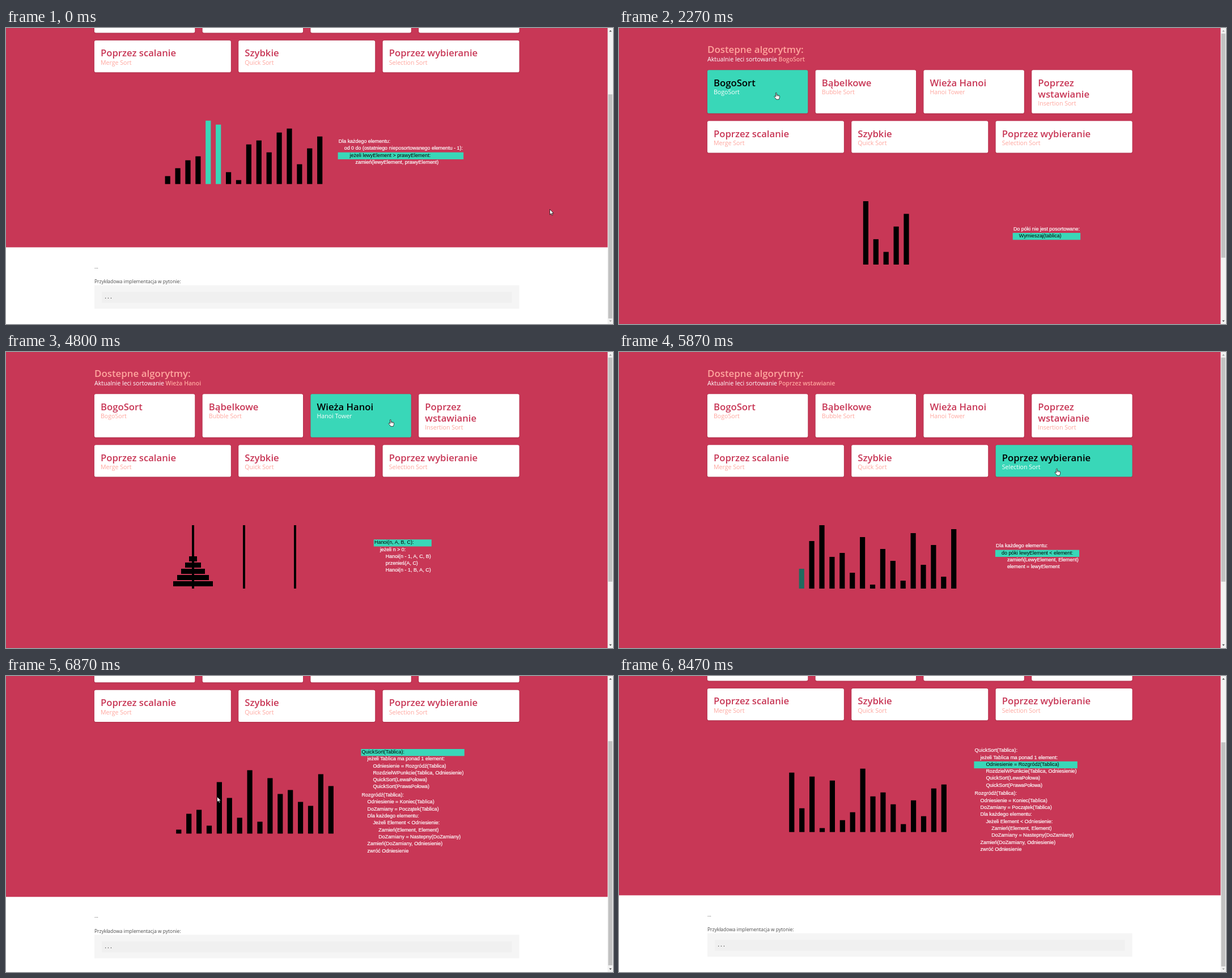
Animation, 1071 px wide and 523 px high, one loop 8740 ms. Source, as an HTML page:

```html
<!DOCTYPE html>
<html lang="pl">
<head>
<meta charset="utf-8">
<title>Sortowanie</title>
<style>
  html, body { margin: 0; width: 100%; height: 100%; overflow: hidden; background: #fff; }
  svg { display: block; width: 100%; height: 100%; }
  text { font-family: "Open Sans", "Noto Sans", sans-serif; white-space: pre; }
  .title { font-size: 16.7px; font-weight: 600; fill: #c83756; }
  .sub { font-size: 10.6px; fill: #ffa69e; }
  .strong { font-size: 10.5px; font-weight: 600; fill: #ffa69e; }
  .card rect {
    fill: #fff; stroke: rgba(10, 10, 10, .1); stroke-width: 1.1px; paint-order: stroke;
    filter: drop-shadow(0 1.1px .8px rgba(10, 10, 10, .1));
  }
  .card.hover rect { fill: #39d7b8; }
  .card.hover .title { fill: #000; }
  .card.hover .sub { fill: #fff; }
  .code text { font: 8.93px "Liberation Sans", Arial, sans-serif; fill: #fff; stroke: #fff; stroke-width: .2px; }
  .code text.on { fill: #000; stroke: none; }
  .note { font-size: 8.45px; fill: #4a4a4a; }
  .mono { font: 8px "DejaVu Sans Mono", "Noto Sans Mono", monospace; fill: #222; }
</style>
</head>
<body>
<svg viewBox="0 0 1071 523" preserveAspectRatio="none">
  <rect width="1071" height="523" fill="#fff"/>
  <g id="page">
    <rect y="-2" width="1062" height="531.8" fill="#c83756"/>
    <text class="title" x="156" y="44" style="fill:#ffa69e;font-size:16.9px">Dostepne algorytmy:</text>
    <text class="sub" x="156" y="58.6" style="fill:#fff">Aktualnie leci sortowanie</text>
    <text class="strong" id="current" x="281.5" y="58.6"></text>
    <g id="cards"></g>
    <g id="bars"></g>
    <g id="code" class="code"></g>
    <text class="note" x="156" y="567">...</text>
    <text class="note" x="156" y="593.2">Przykładowa implementacja w pytonie:</text>
    <rect x="155.9" y="596.8" width="749.7" height="41.5" fill="#f5f5f5"/>
    <rect x="169" y="608.3" width="723.5" height="19.6" fill="#f0f0f0"/>
    <text class="mono" x="173.3" y="620.8">...</text>
  </g>
  <rect x="1061.5" width="9.5" height="523" fill="#f1f1f1"/>
  <rect id="thumb" x="1062.6" width="7.3" height="396" fill="#c1c1c1"/>
  <path id="up" d="M1064.2 6.5h4.6l-2.3-2.8z"/>
  <path id="down" d="M1064.2 516.5h4.6l-2.3 2.8z"/>
  <g id="cursor" fill="#fff" stroke="#000" stroke-width="1.3" stroke-linejoin="round">
    <path id="arrow" transform="scale(.56)" d="M0 0V17L4 13.3L6.6 19.3L9.2 18.2L6.7 12.3H12Z"/>
    <g id="hand" transform="translate(-3.6 -.3) scale(.56)">
      <path d="M5 2C5 .2 8 .2 8 2V8C8.6 7 10.6 7.2 11 8.6C12 7.8 13.6 8.2 14 9.6C15 9 17.4 9.4 17.4 11.2V15C17.4 18.5 15.5 19 15.5 22H7C6.5 19.5 1 15.5 .6 13C.5 11 3.4 11 5 13.6Z"/>
      <path d="M8 8v4M11 8.6v3.6M14 9.6v3" fill="none" stroke-width="1"/>
    </g>
  </g>
</svg>
<script>
const LOOP = 8740, TICKS_PER_MS = 15 / 1000;
const MAX_SCROLL = 142.3, FLOOR = 418, TALLEST = 112, ROW = 12.3;
const LEFT = 155.9, WIDTH = 749.7, GAP = 13.4;
const TEAL = '#39d7b8', DIM = '#1f6b5f';
const $ = id => document.getElementById(id);

const smooth = (t, from, to) => {
  const p = Math.min(1, Math.max(0, (t - from) / (to - from)));
  return p * p * (3 - 2 * p);
};
const rect = (x, y, w, h, fill) => `<rect x="${x}" y="${y}" width="${w}" height="${h}" fill="${fill}"/>`;
const label = (cls, x, y, s) => `<text class="${cls}" x="${x}" y="${y}">${s.replace(/</g, '&lt;')}</text>`;

function cardRow(y, h, items) {
  const w = (WIDTH - GAP * (items.length - 1)) / items.length;
  return items.map(([title, sub], i) => ({ title: title.split('\n'), sub, x: LEFT + i * (w + GAP), y, w, h }));
}

const cards = [
  ...cardRow(74.2, 76.6, [['BogoSort', 'BogoSort'], ['Bąbelkowe', 'Bubble Sort'],
    ['Wieża Hanoi', 'Hanoi Tower'], ['Poprzez\nwstawianie', 'Insertion Sort']]),
  ...cardRow(164.2, 56.3, [['Poprzez scalanie', 'Merge Sort'], ['Szybkie', 'Quick Sort'],
    ['Poprzez wybieranie', 'Selection Sort']])
];

// Each leading space in a code line is one indent step; an empty line is a short gap.
const views = {
  bogo: {
    name: 'BogoSort', barX: 430.8, codeX: 695.9,
    code: ['Do póki nie jest posortowane:', ' Wymieszaj(tablica)']
  },
  bubble: {
    name: 'Bąbelkowe', barX: 280.6, codeX: 586.8,
    code: ['Dla każdego elementu:', ' od 0 do (ostatniego nieposortowanego elementu - 1):',
      '  jeżeli lewyElement > prawyElement:', '   zamień(lewyElement, prawyElement)']
  },
  hanoi: {
    name: 'Wieża Hanoi', codeX: 650,
    code: ['Hanoi(n, A, B, C):', ' jeżeli n > 0:', '  Hanoi(n - 1, A, C, B)',
      '  przenieś(A, C)', '  Hanoi(n - 1, B, A, C)']
  },
  insertion: {
    name: 'Poprzez wstawianie', barX: 317.6, codeX: 665.1,
    code: ['Dla każdego elementu:', ' do póki lewyElement < element:',
      '  zamień(LewyElement, Element)', '  element = lewyElement']
  },
  quick: {
    name: 'Szybkie', barX: 300.2, codeX: 627.6,
    code: ['QuickSort(Tablica):', ' jeżeli Tablica ma ponad 1 element:',
      '  Odniesienie = Rozgródź(Tablica)', '  RozdzielWPunkcie(Tablica, Odniesienie)',
      '  QuickSort(LewaPołowa)', '  QuickSort(PrawaPołowa)', '',
      'Rozgródź(Tablica):', ' Odniesienie = Koniec(Tablica)', ' DoZamiany = Początek(Tablica)',
      ' Dla każdego elementu:', '  Jeżeli Element < Odniesienie:', '   Zamień(Element, Element)',
      '   DoZamiany = Nastepny(DoZamiany)', ' Zamień(DoZamiany, Odniesienie)', ' zwróć Odniesienie']
  }
};

// Bars are spelled as letters, a being the shortest.
const scenes = [
  { at: 0, view: 'bubble', bars: 'bdfgpocajkhmneil', line: 2, marked: [4, 5] },
  { at: 34, view: 'bogo', bars: 'ebacd', line: 1 },
  { at: 46, view: 'bogo', bars: shuffle('ebacd', 7), line: 1 },
  { at: 49, view: 'bubble', bars: 'bifnlkamdgejpcoh', line: 0 },
  { at: 58, line: 1 },
  { at: 66, view: 'hanoi', line: 0 },
  { at: 80, view: 'insertion', bars: 'elphidmajgbnfkco', line: 0 },
  { at: 86, line: 1, marked: [0], tint: DIM },
  { at: 95, view: 'quick', bars: 'aefbmidpcnjkhgol', line: 0, marked: [] },
  { at: 115, bars: 'ofnamcepijgbhdkl' },
  { at: 127, line: 2 }
];
scenes.forEach((s, i) => {
  const before = scenes[i - 1];
  const base = !before ? {} : s.view ? { marked: [], tint: TEAL } : before;
  scenes[i] = { tint: TEAL, ...base, ...s };
});

const home = [959.5, 320.3];
// Cursor glides: start tick, end tick, destination.
const glides = [
  [3, 21, 921, 314.8], [21, 32, 277.2, 114.2], [36, 41, 459.5, 124.3], [54, 60, 622, 120],
  [69, 77, 800, 118], [85, 88, 772.5, 206], [91, 95, 505, 197], [98, 103, 372.5, 213.3],
  [112, 115, 308, 52], [119, 124, 92, 530]
];

function shuffle(word, seed) {
  const a = [...word];
  for (let i = a.length - 1; i > 0; i--) {
    seed = (seed * 16807) % 2147483647;
    const j = seed % (i + 1);
    [a[i], a[j]] = [a[j], a[i]];
  }
  return a.join('');
}

const scrollAt = t => MAX_SCROLL * (1 - smooth(t, 19, 28.5) + smooth(t, 99, 103.36));

function cursorAt(t) {
  return glides.reduce(([x, y], [from, to, toX, toY]) => {
    const p = smooth(t, from, to);
    return [x + (toX - x) * p, y + (toY - y) * p];
  }, home);
}

function cardMarkup({ title, sub, x, y, w, h }) {
  const left = x + 11.1, lineH = 20.1;
  const lines = title.map((s, i) => label('title', left, y + 28.4 + i * lineH, s)).join('');
  const subY = y + 43 + (title.length - 1) * lineH;
  return `<g class="card"><rect x="${x}" y="${y}" width="${w}" height="${h}" rx="2.8"/>${lines}${label('sub', left, subY, sub)}</g>`;
}

function barMarkup({ view, bars, marked, tint }) {
  return [...bars].map((c, i) => {
    const h = TALLEST * (c.charCodeAt(0) - 96) / bars.length;
    return rect(views[view].barX + i * 17.9, FLOOR - h, 9.2, h, marked.includes(i) ? tint : '#000');
  }).join('');
}

function towerMarkup() {
  let out = '';
  for (let peg = 0; peg < 3; peg++) out += rect(328 + peg * 90, FLOOR - TALLEST, 4, TALLEST, '#000');
  for (let n = 1; n <= 5; n++) out += rect(330 - n * 7, 350 + n * 11, n * 14, 9, '#000');
  return out;
}

function drawCode(group, { code, codeX }, active) {
  const rowH = s => s ? ROW : 2.4;
  let y = 362 - code.reduce((sum, s) => sum + rowH(s), 0) / 2, activeY = y;
  group.innerHTML = code.map((s, i) => {
    const text = s.trimStart(), x = codeX + (s.length - text.length) * 9.9;
    if (i === active) activeY = y;
    const out = label(i === active ? 'on' : '', x, y + 8, text);
    y += rowH(s);
    return out;
  }).join('');
  const width = group.getBBox().width + 2.4;
  group.insertAdjacentHTML('afterbegin', rect(codeX - 1.2, activeY, width, ROW, TEAL));
}

$('cards').innerHTML = cards.map(cardMarkup).join('');
const cardNodes = [...$('cards').children];
let shown = null;

function showScene(scene) {
  if (scene === shown) return;
  shown = scene;
  const view = views[scene.view];
  $('current').textContent = view.name;
  $('bars').innerHTML = scene.view === 'hanoi' ? towerMarkup() : barMarkup(scene);
  drawCode($('code'), view, scene.line);
}

function render(t) {
  const scroll = scrollAt(t), [x, y] = cursorAt(t), pageY = y + scroll;
  showScene(scenes.filter(s => s.at <= t).pop());
  $('page').setAttribute('transform', `translate(0 ${-scroll})`);
  $('thumb').setAttribute('y', 9.8 + scroll * .755);
  $('up').setAttribute('fill', scroll > 0 ? '#505050' : '#a3a3a3');
  $('down').setAttribute('fill', scroll < MAX_SCROLL ? '#505050' : '#a3a3a3');

  const over = cards.findIndex(c => x >= c.x && x <= c.x + c.w && pageY >= c.y && pageY <= c.y + c.h);
  cardNodes.forEach((node, i) => node.classList.toggle('hover', i === over));
  $('arrow').setAttribute('visibility', over < 0 ? 'visible' : 'hidden');
  $('hand').setAttribute('visibility', over < 0 ? 'hidden' : 'visible');
  $('cursor').setAttribute('transform', `translate(${x} ${y})`);
}

const start = performance.now();
function tick() {
  const ms = (performance.now() - start) % LOOP;
  render(Math.floor((ms + 4) * TICKS_PER_MS));
  requestAnimationFrame(tick);
}
tick();
</script>
</body>
</html>
```
